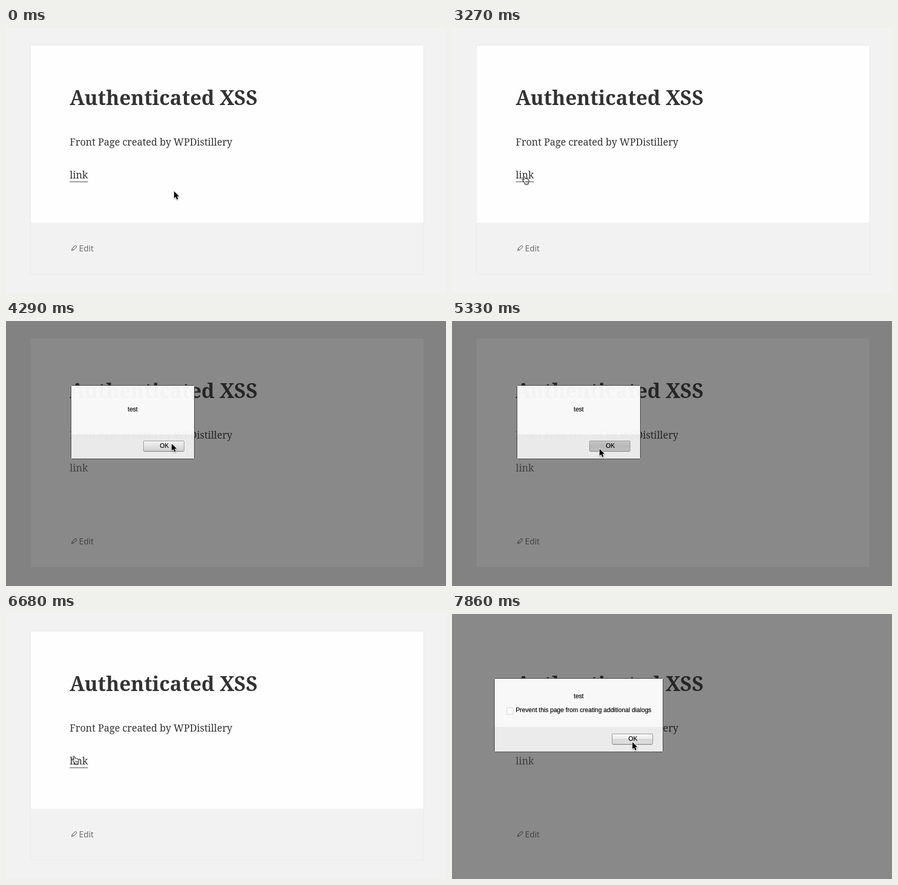
An HTML page for the animation above (8 s loop, 856 by 516 pixels).

```html
<!DOCTYPE html>
<html lang="en">
<head>
<meta charset="utf-8">
<title>Link dialog</title>
<style>
  html, body { margin: 0; width: 100%; height: 100%; overflow: hidden; }
  svg { display: block; width: 856px; height: 516px; }
  .serif { font: 19px "Noto Serif", serif; }
  .title { font: bold 39px "Noto Serif", serif; }
  .sans { font: 16px "Noto Sans", sans-serif; }
  .dialog text { font: 12.06px "Liberation Sans", Arial, sans-serif; stroke: #000; stroke-width: .2; }
  .frame { fill: none; stroke: #3a3a3a; }
  .mid { text-anchor: middle; }
  #page { --bg: #f2f2f2; --card: #fefefe; --ink: #333; --link: #333; --meta: #707070; }
  #page.dim { --bg: #828282; --card: #898989; --ink: #262626; --link: #404040; --meta: #444; }
  #page.flat { --bg: #898989; --card: #898989; }
  .dim .bright { display: none; }
  #cursor { filter: drop-shadow(0 1px 1px rgba(0,0,0,.35)); }
</style>
</head>
<body>
<svg viewBox="0 0 856 516">
  <defs>
    <linearGradient id="up" x2="0" y2="1">
      <stop offset="0" stop-color="#f8f8f8"/><stop offset=".48" stop-color="#ececec"/>
      <stop offset=".5" stop-color="#d9d9d9"/><stop offset="1" stop-color="#dedede"/>
    </linearGradient>
    <linearGradient id="soft" x2="0" y2="1">
      <stop offset="0" stop-color="#f4f4f4"/><stop offset="1" stop-color="#d0d0d0"/>
    </linearGradient>
    <linearGradient id="down" x2="0" y2="1">
      <stop offset="0" stop-color="#c6c6c6"/><stop offset=".5" stop-color="#b8b8b8"/>
      <stop offset="1" stop-color="#c0c0c0"/>
    </linearGradient>
  </defs>

  <g id="page">
    <rect width="856" height="516" fill="var(--bg)"/>
    <rect x="48" y="34" width="764" height="445" fill="var(--card)"/>
    <g class="bright">
      <rect x="48" y="379" width="764" height="100" fill="#f2f2f2"/>
      <rect x="47.5" y="33.5" width="765" height="446" fill="none" stroke="#e9e9e9"/>
      <path d="M124 299.5h35.5" stroke="#333"/>
    </g>
    <text class="title" x="124" y="150" fill="var(--ink)">Authenticated XSS</text>
    <text class="serif" x="124" y="229" fill="var(--ink)">Front Page created by WPDistillery</text>
    <text class="serif" x="124" y="293" fill="var(--link)">link</text>
    <path d="M127.6 433.4l.8-3.6 6-6q.8-.6 1.6.2l1 1q.8.8.2 1.6l-6 6zM128.6 429.8l2.4 2.4"
          fill="none" stroke="var(--meta)" stroke-width="1.1"/>
    <text class="sans" x="142" y="435" fill="var(--meta)">Edit</text>
  </g>

  <g id="first" class="dialog">
    <rect x="126" y="125" width="241" height="96" fill="#fefefe" opacity=".95"/>
    <rect x="126" y="221" width="241" height="48" fill="#f0f0f0" opacity=".95"/>
    <rect class="frame" x="126.5" y="125.5" width="240" height="143" rx="1"/>
    <text class="mid" x="246.5" y="176">test</text>
    <path d="M269 254.5h76" stroke="#bbb"/>
    <rect id="button" x="267.5" y="233.5" width="79" height="20" rx="1.5" stroke="#929292"/>
    <text class="mid" x="308" y="247">OK</text>
  </g>

  <g id="second" class="dialog">
    <rect x="82" y="125" width="329" height="95" fill="#f8f8f8"/>
    <rect x="82" y="220" width="329" height="49" fill="#ebebeb"/>
    <rect class="frame" x="82.5" y="125.5" width="328" height="143" rx="1"/>
    <text class="mid" x="246.5" y="164">test</text>
    <rect x="106.5" y="182.5" width="13" height="13" rx="2.5" fill="#fafafa" stroke="#d2d2d2"/>
    <text x="124" y="191">Prevent this page from creating additional dialogs</text>
    <path d="M313 254.5h76" stroke="#bbb"/>
    <rect x="311.5" y="233.5" width="79" height="20" rx="1.5" fill="url(#up)" stroke="#8c8c8c"/>
    <text class="mid" x="352" y="247">OK</text>
  </g>

  <g id="cursor">
    <path id="arrow" d="M0 0V13.6l3.1-2.9 2.3 5.2 2.5-1.1-2.3-5.1h4.2z"
          stroke="#fff" stroke-width="2" paint-order="stroke" stroke-linejoin="round"/>
    <g id="hand" transform="translate(-4.5 1)" fill="#fff" stroke="#000" stroke-linejoin="round">
      <path d="M4.4 11.2L2.2 8.6Q.6 7.2 1.2 6.6 2.4 6 4.6 8.2L3.4 3Q2.8.6 4.2.6 5.4.6 6 2.8L6.9 5.6Q7.4 4.6 8.6 5 9.6 5.2 9.8 6 10.8 5.4 11.8 6.2L12.2 7Q13.8 6.6 14 8.4 14.2 11 13 13.4L12.6 16H6.4Q6.2 14 4.4 11.2z"/>
      <path d="M7.7 9.8v3.4M9.8 9.8v3.4M11.8 9.8v3.4" stroke-width=".8"/>
    </g>
  </g>
</svg>
<script>
const $ = id => document.getElementById(id);
const LOOP = 8000, TICK = 147;

// Each sweep curves from the last resting point past `bend` to `end`.
const home = [327, 318];
const sweeps = [
  { at: 150, steps: 3, bend: [219, 214], end: [257, 318] },
  { at: 1350, steps: 6, bend: [215, 322], end: [140, 287] },
  { at: 3850, steps: 5, bend: [430, 213], end: [280, 249] },
  { at: 5030, steps: 1, bend: [283, 249], end: [287, 249] },
  { at: 6530, steps: 2, bend: [190, 266], end: [132, 275] },
  { at: 6970, steps: 5, bend: [210, 305], end: [317, 261] },
  { at: 7710, steps: 2, bend: [338, 251], end: [351, 249.5] }
];

const curve = (a, b, c, u) =>
  a.map((p, i) => (1 - u) ** 2 * p + 2 * u * (1 - u) * b[i] + u * u * c[i]);

function pointer(t) {
  const i = sweeps.findLastIndex(s => s.at <= t);
  if (i < 0) return home;
  const { at, steps, bend, end } = sweeps[i];
  const step = Math.min(steps, Math.floor((t - at) / TICK) + 1);
  return curve(i ? sweeps[i - 1].end : home, bend, end, step / steps);
}

const show = (id, on) => $(id).style.display = on ? "" : "none";

function draw() {
  const t = performance.now() % LOOP;
  const within = (from, to) => t >= from && t < to;
  const first = within(3400, 5480);
  const second = t >= 6830;
  const hover = within(2085, 3400) || within(6677, 6830);

  $("page").setAttribute("class", second ? "dim flat" : first ? "dim" : "");
  show("first", first);
  show("second", second);
  $("button").setAttribute("fill", t >= 5330 ? "url(#down)" : "url(#soft)");
  $("cursor").setAttribute("transform", `translate(${pointer(t)})`);
  show("hand", hover);
  show("arrow", !hover);
  requestAnimationFrame(draw);
}
draw();
</script>
</body>
</html>
```
